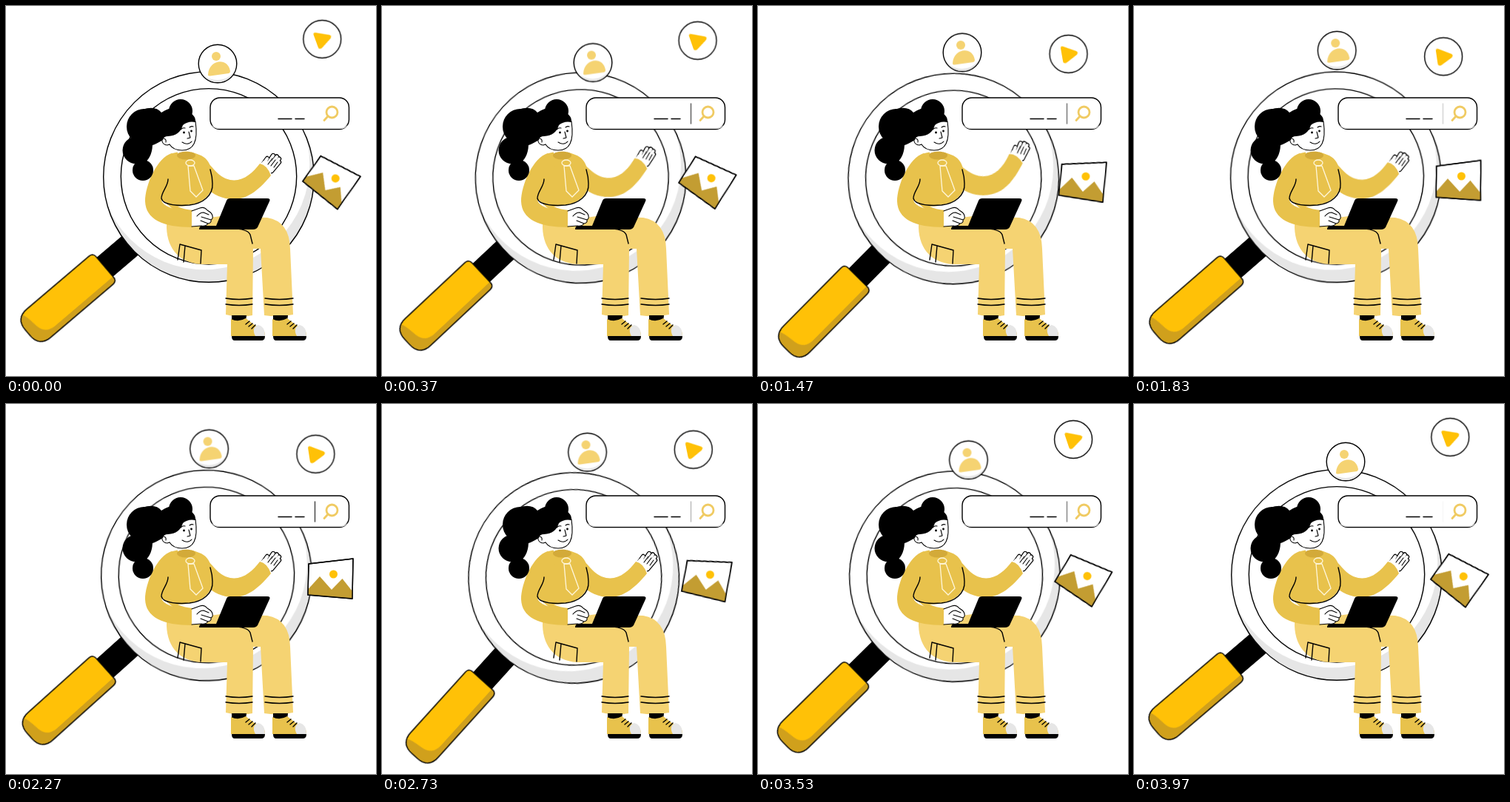
Animation of 500 by 500 pixels, one loop 4000 ms. Source, as an HTML page:

```html
<!DOCTYPE html>
<html lang="en">
<head>
<meta charset="utf-8">
<title>Search illustration</title>
<style>
html, body { margin: 0; width: 100%; height: 100%; overflow: hidden; background: #fff; }
svg { display: block; width: 100vw; height: 100vh; }

:root { --sine: cubic-bezier(.364, 0, .636, 1); }
.lens, .avatar, .play, .play-mark, .photo {
  animation: 2s var(--sine) infinite alternate;
}
.lens { transform-origin: 297px 346px; animation-name: swing; animation-duration: 1s; }
.avatar { animation-name: drift-up; }
.play { animation-name: drift-down; }
.play-mark { animation-name: tilt; }
.photo { transform-origin: 439px 236px; animation-name: turn; }
.arm { transform-origin: 282px 222px; animation: wave 4s var(--sine) infinite; }
.caret { animation: blink 1s linear -.97s infinite; }

@keyframes swing { to { transform: rotate(-9deg); } }
@keyframes drift-up {
  from { transform: translate(286px, 78px); }
  to { transform: translate(274px, 59.8px); }
}
@keyframes drift-down {
  from { transform: translate(427.3px, 44.7px); }
  to { transform: translate(418px, 68.7px); }
}
@keyframes tilt { from { transform: rotate(-20deg); } to { transform: rotate(-8deg); } }
@keyframes turn { from { transform: rotate(34deg); } to { transform: rotate(-1.5deg); } }
@keyframes wave { 0%, 50%, 100% { transform: none; } 25% { transform: rotate(-23deg); } }
@keyframes blink { from { opacity: 1; } 97%, to { opacity: 0; } }

.line { fill: none; stroke: #000; stroke-width: 1.4; stroke-linecap: round; stroke-linejoin: round; }
.card { fill: #fff; stroke: #000; stroke-width: 1.4; }
.shirt { fill: #e8c24c; }
.pale { fill: #f5d372; }
.amber { fill: #ffc107; }
.shade { fill: #e6e6e6; }
.fine { stroke-width: 1.1; }
.finger-edge, .finger { fill: none; stroke-linecap: round; stroke-linejoin: round; }
.finger-edge { stroke: #000; stroke-width: 6.4; }
.finger { stroke: #fff; stroke-width: 4; }
</style>
</head>
<body>
<svg viewBox="0 0 500 500" xmlns="http://www.w3.org/2000/svg">
  <defs>
    <clipPath id="rim"><circle cx="274" cy="231" r="142.3"/></clipPath>
    <path id="grip" d="M194 -25H304Q324 -25 324 -5V5Q324 25 304 25H194Q187 25 187 18V-18Q187 -25 194 -25Z"/>
    <path id="fingers" d="M348 217L348 213L353 206M351 217L361 202M354 219L366 203.500M357 221L369 206.500M359 223L369 211"/>
    <g id="shoe">
      <path d="M305 418L325 418L324 426L305 426Z"/>
      <path class="shirt" d="M304 423Q314 428 324 422L337 432Q350 433 350 446L304 446Z"/>
      <path class="shade" d="M336 444Q332 434 341 431Q350 433 350 446L337 446Z"/>
      <path d="M305 446H350Q350 452 345 452H309Q305 452 305 446Z"/>
      <path class="line" d="M324 430L329 426M328 433L333 429M332 436L337 431"/>
    </g>
  </defs>

  <!-- Magnifier -->
  <g class="lens">
    <g transform="translate(276 231.500) rotate(139.6)">
      <rect x="140" y="-17" width="50" height="34"/>
      <use href="#grip" fill="#d0a01c"/>
      <path class="amber" d="M187 -17H291Q307 -16 309 0Q311 20 314 23L304 25H194Q187 25 187 18Z"/>
      <use href="#grip" class="line"/>
    </g>
    <circle class="shade" cx="274" cy="231" r="142.3"/>
    <circle cx="268" cy="214" r="142.3" fill="#fff" clip-path="url(#rim)"/>
    <circle class="line" cx="274" cy="231" r="142.3"/>
    <circle class="card" cx="274" cy="230.3" r="118.7"/>
  </g>

  <!-- Waving arm -->
  <g class="arm">
    <use href="#fingers" class="finger-edge"/>
    <path d="M343 214L348 209L362 210L365 218L355 229Z" fill="#fff"/>
    <use href="#fingers" class="finger"/>
    <path class="line fine" d="M354 214L360 206M358 216L364 208M362 218L367 211"/>
    <path class="shirt" d="M266 207C280 215 284 231 303 235C320 238 333 226 343 213Q353 215 358 229C344 246 328 261 308 261C292 261 280 255 270 245Z"/>
  </g>

  <!-- Legs -->
  <path class="pale" d="M217 294C216 324 231 347 264 349H299L297 417Q315 422 333 418L334 328H344L349 418Q369 421 388 417L384 328Q383 291 353 286L290 284Z"/>
  <path class="line" d="M300 301Q326 300 330 309L333 321M297 395Q315 398 333 395M297 403Q315 406 333 403M350 395Q370 398 388 395M350 403Q370 406 388 403M235 322L232 343M235 322L264 330L263 348M242 324L240 346"/>
  <use href="#shoe"/>
  <use href="#shoe" x="56"/>

  <!-- Torso and resting arm -->
  <path class="shirt" d="M222 200Q244 193 261 201C279 207 279 228 279 240C278 258 262 268 245 269C225 271 211 265 210 260Z"/>
  <path class="shirt" d="M224 199C204 205 188 242 188 264C189 288 211 299 252 299L253 275C231 278 209 271 210 260C210 250 219 243 219 233L240 210Z"/>
  <path class="shirt" d="M211 262Q218 270 240 269L253 275L232 280Z"/>
  <path d="M232 271Q254 270 266 264L274 273L253 276Q240 275 232 271Z" fill="#fff"/>
  <path class="line" d="M219 234C219 244 210 251 210 260C212 270 236 270 248 269C266 267 280 256 279 240Q279 231 276 221"/>

  <!-- Head -->
  <path d="M231 188H250V199Q243 207 232 199Z" fill="#fff"/>
  <ellipse cx="243.500" cy="202" rx="12.500" ry="5.500" fill="#d3aa39"/>
  <path class="card fine" d="M216 174C208 174 209 188 218 188L221 187Q226 195 238 195C253 195 260 184 256 156L228 148Z"/>
  <g>
    <circle cx="187" cy="163" r="24"/>
    <circle cx="236" cy="142" r="16"/>
    <circle cx="176" cy="195" r="18.500"/>
    <circle cx="185" cy="222" r="14"/>
    <path d="M184 140Q202 134 210 144Q226 133 241 141Q257 146 256 157Q246 155 239 161Q235 175 219 176Q213 176 212 181Q202 187 198 188Q197 207 184 214Z"/>
  </g>
  <circle cx="240.500" cy="171" r="1.400"/>
  <circle cx="250.500" cy="169" r="1.400"/>
  <path class="line fine" d="M236 167Q239 164 242 165M248 164Q251 162 253 163M247 170L249 178L245 179M238 184Q246 189 251 183M213 179Q217 180 216 184"/>
  <g fill="none" stroke="#fff7dc" stroke-width="1.3" stroke-linejoin="round">
    <ellipse cx="249" cy="212" rx="6" ry="4"/>
    <path d="M246 216L254 216L266 249L257 258L249 250Z"/>
  </g>

  <!-- Laptop -->
  <path d="M303 260H353Q358 260 356 264L340 299Q338 302 334 302H261Q261 297 266 297H284L298 263Q299 260 303 260Z"/>
  <path d="M251 277L262 273Q268 271 272 276Q279 280 279 284Q280 287 277 289Q278 293 273 294Q270 298 264 297L251 298Z" fill="#fff"/>
  <path class="line fine" d="M251 277L262 273Q268 271 272 276Q279 280 279 284Q280 287 277 289Q278 293 273 294Q270 298 264 297L251 298M258 284Q262 279 267 279L274 282M264 285L277 289M263 290L273 294"/>

  <!-- Search field -->
  <rect class="card" x="276" y="124" width="187.500" height="42.500" rx="13"/>
  <path class="shade" d="M278 160Q281 164 289 164.500H451Q460 164 462 160Q460 166 451 166H289Q280 166 278 160Z"/>
  <path class="line" d="M368 152.500H386M391 152.500H403"/>
  <path class="line caret" d="M417.500 132V159"/>
  <g fill="none" stroke="#f0cb63" stroke-width="2.800" stroke-linecap="round">
    <circle cx="440.500" cy="143.500" r="7.500"/>
    <path d="M435 149L430 154.500"/>
  </g>

  <!-- Floating icons -->
  <g class="avatar">
    <circle class="card" r="25.800"/>
    <path class="shade" d="M-20 15A25 25 0 0 0 24 7Q17 21 0 22Q-12 22 -20 15Z"/>
    <circle class="pale" cx="-2" cy="-10" r="6"/>
    <path class="pale" d="M-13 15C-12 -6 14 -9 17 10Q17 12.500 15 13L-10 16.500Q-13 17 -13 15Z"/>
  </g>
  <g class="play">
    <circle class="card" r="25.500"/>
    <path class="amber play-mark" d="M-9 -9Q-9 -13 -5 -11L11 -2Q14 0 11 3L-4 11Q-9 13 -9 8Z"/>
  </g>
  <g class="photo">
    <path class="card" d="M409 216L469 209L468 263L408 258Z"/>
    <path d="M408.600 250L424 233L440 251L454.500 236L468 253V262.500L408.500 257.500Z" fill="#c39d32"/>
    <circle class="amber" cx="442.500" cy="230" r="5.500"/>
    <path class="line" d="M409 216L469 209L468 263L408 258Z"/>
  </g>
</svg>
</body>
</html>
```
